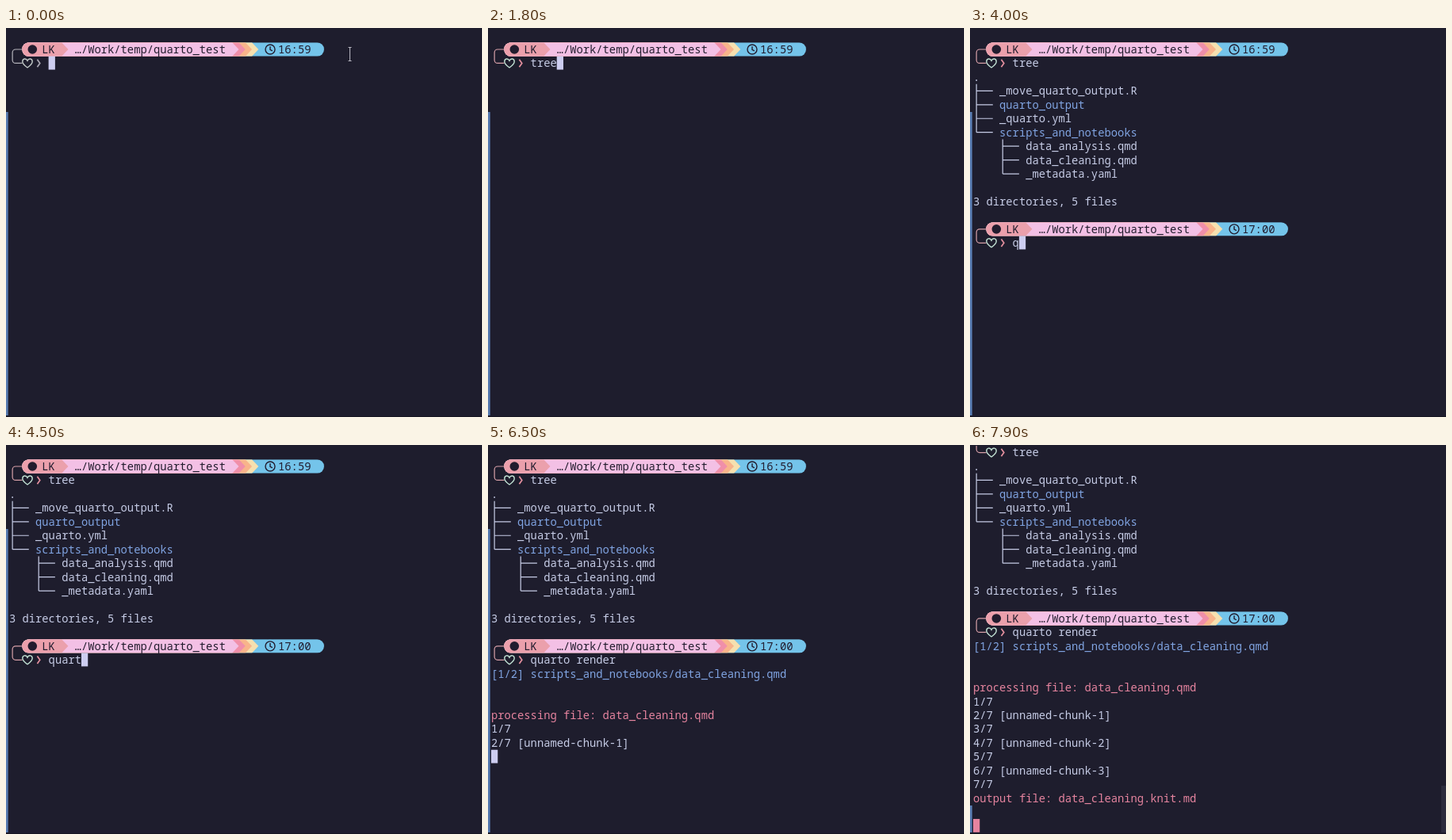
Write an HTML page with a canvas that moves like this. It is 600 px wide and 491 px high and loops after 8000 ms.

```html
<!DOCTYPE html>
<html lang="en">
<head>
<meta charset="utf-8">
<title>Terminal session</title>
<style>
  html, body { margin: 0; width: 100%; height: 100%; overflow: hidden; background: #1e1d2d; }
  canvas { display: block; width: 600px; height: 491px; }
</style>
</head>
<body>
<canvas id="stage" width="600" height="491"></canvas>
<script>
const ctx = document.getElementById('stage').getContext('2d');
const LOOP = 8000;
const CELL = 8.27, LINE = 17.45, LEFT = 4, TOP = 27;
const FONT = '13.78px "Noto Sans Mono", "DejaVu Sans Mono", monospace';
const C = {
  bg: '#1e1d2d', text: '#c6cce6', blue: '#80a4e2', red: '#e6849f',
  ink: '#221c2e', cursor: '#cdcdf0', bar: '#587cb2',
  maroon: '#eba0ac', pink: '#f3c0e5', rose: '#f08fa9',
  peach: '#f8b48b', yellow: '#f6e0af', sky: '#74c4ea'
};

// Keystroke times, one entry per typed character
const TREE_KEYS = [1500, 1600, 1700, 1800];
const RENDER_KEYS = [4000, 4100, 4300, 4400, 4500, 4600, 4700, 4800, 4900, 5000, 5100, 5100, 5200];

// Printed lines: time, row, column, text, colour
const OUTPUT = [
  [2200, 2, 0, '.'],
  [2200, 3, 4, '_move_quarto_output.R'],
  [2200, 4, 4, 'quarto_output', C.blue],
  [2200, 5, 4, '_quarto.yml'],
  [2200, 6, 4, 'scripts_and_notebooks', C.blue],
  [2200, 7, 8, 'data_analysis.qmd'],
  [2200, 8, 8, 'data_cleaning.qmd'],
  [2200, 9, 8, '_metadata.yaml'],
  [2200, 11, 0, '3 directories, 5 files'],
  [6200, 15, 0, '[1/2] scripts_and_notebooks/data_cleaning.qmd', C.blue],
  [6500, 18, 0, 'processing file: data_cleaning.qmd', C.red],
  [7000, 26, 0, 'output file: data_cleaning.knit.md', C.red]
];
for (let i = 1; i <= 7; i++) {
  const chunk = i % 2 ? '' : ` [unnamed-chunk-${i / 2}]`;
  OUTPUT.push([i < 3 ? 6500 : 7000, 18 + i, 0, `${i}/7${chunk}`]);
}

const colX = c => LEFT + c * CELL;
const rowY = r => TOP + r * LINE;
const typed = (keys, t) => keys.filter(k => k <= t).length;

// Characters sit on the terminal's cell grid
function print(row, col, text, color = C.text) {
  ctx.fillStyle = color;
  [...text].forEach((ch, i) => ctx.fillText(ch, colX(col + i), rowY(row) + 4.9));
}

function block(row, col, color = C.cursor) {
  ctx.fillStyle = color;
  ctx.fillRect(colX(col), rowY(row) - LINE / 2, CELL, LINE - 0.6);
}

function stroke(color, width, draw) {
  ctx.strokeStyle = color;
  ctx.lineWidth = width;
  ctx.beginPath();
  draw();
  ctx.stroke();
}

function disc(x, y, r, color) {
  ctx.fillStyle = color;
  ctx.beginPath();
  ctx.arc(x, y, r, 0, Math.PI * 2);
  ctx.fill();
}

// Segment from column a to b, ending in an arrow one cell wide
function segment(row, a, b, color) {
  const y = rowY(row), h = LINE / 2, x = colX(b);
  ctx.fillStyle = color;
  ctx.beginPath();
  ctx.moveTo(colX(a), y - h);
  ctx.lineTo(x, y - h);
  ctx.lineTo(x + CELL, y);
  ctx.lineTo(x, y + h);
  ctx.lineTo(colX(a), y + h);
  ctx.fill();
}

function ribbon(row, clock) {
  const y = rowY(row), h = LINE / 2;
  ctx.save();
  ctx.beginPath();
  ctx.roundRect(colX(2) - 0.3, y - h, CELL * 46 + 0.3, LINE, h);
  ctx.clip();
  ctx.fillStyle = C.sky;
  ctx.fillRect(colX(2) - 1, y - h, CELL * 47, LINE);
  segment(row, 2, 37, C.yellow);
  segment(row, 2, 36, C.peach);
  segment(row, 2, 35, C.rose);
  segment(row, 2, 34, C.pink);
  segment(row, 1, 8, C.maroon);
  ctx.restore();

  disc(33.3, y, 5.8, C.ink);
  print(row, 5, 'LK', C.ink);
  print(row, 10, '…/Work/temp/quarto_test', C.ink);
  stroke(C.ink, 1.4, () => {
    ctx.arc(333, y, 6, 0, Math.PI * 2);
    ctx.moveTo(333, y - 3.8);
    ctx.lineTo(333, y + 0.3);
    ctx.lineTo(335.8, y + 1.8);
  });
  print(row, 41, clock, C.ink);
}

function inputMarks(row, idle) {
  const y = rowY(row), top = rowY(row - 1), x = colX(0.5);
  stroke(idle ? '#b5b4bb' : '#d7a0a8', 1.2, () => {
    ctx.moveTo(colX(2), top);
    ctx.arcTo(x, top, x, y, 4);
    ctx.arcTo(x, y, colX(2), y, 4);
    ctx.lineTo(colX(2), y);
  });
  stroke(idle ? '#c3cbc9' : '#c2e2d4', 1.4, () => {
    ctx.moveTo(27, y + 5.6);
    ctx.bezierCurveTo(23, y + 2.6, 20.8, y + 0.6, 20.8, y - 2);
    ctx.bezierCurveTo(20.8, y - 6.2, 25.5, y - 6.6, 27, y - 3.2);
    ctx.bezierCurveTo(28.5, y - 6.6, 33.2, y - 6.2, 33.2, y - 2);
    ctx.bezierCurveTo(33.2, y + 0.6, 31, y + 2.6, 27, y + 5.6);
  });
  stroke(idle ? '#aaa8b4' : '#e5909f', 1.7, () => {
    ctx.moveTo(39.4, y - 4.7);
    ctx.lineTo(42.8, y);
    ctx.lineTo(39.4, y + 4.7);
  });
}

function branches(col, first, last) {
  const x = colX(col + 0.5);
  stroke(C.text, 1.2, () => {
    ctx.moveTo(x, rowY(first - 0.5));
    ctx.lineTo(x, rowY(last));
    for (let r = first; r <= last; r++) {
      ctx.moveTo(x, rowY(r));
      ctx.lineTo(colX(col + 3), rowY(r));
    }
  });
}

function drawCursor(t) {
  if (t < 2200) block(1, 6 + typed(TREE_KEYS, t));
  else if (t < 2300) block(12, 0);
  else if (t < 5900) block(14, 6 + typed(RENDER_KEYS, t));
  else if (t < 6200) block(15, 0);
  else if (t < 6500) block(16, 0);
  else if (t < 7000) block(21, 0);
  else block(t < 7400 ? 27 : 28, 0, C.red);
}

function ibeam(x, y) {
  stroke('#b9b8c2', 1, () => {
    ctx.moveTo(x, y - 8.5);
    ctx.lineTo(x, y + 8.5);
    for (const end of [y - 8.5, y + 8.5]) {
      ctx.moveTo(x - 2, end);
      ctx.lineTo(x + 2, end);
    }
  });
}

function draw(t) {
  const scroll = t < 7000 ? 0 : t < 7400 ? 1 : 2;
  ctx.fillStyle = C.bg;
  ctx.fillRect(0, 0, 600, 491);
  ctx.font = FONT;
  ctx.textBaseline = 'alphabetic';

  ctx.save();
  ctx.beginPath();
  ctx.rect(0, 1, 600, 489);
  ctx.clip();
  ctx.translate(0, -scroll * LINE);
  inputMarks(1, t < 1500);
  ribbon(0, '16:59');
  print(1, 6, 'tree'.slice(0, typed(TREE_KEYS, t)));
  if (t >= 2200) {
    branches(0, 3, 6);
    branches(4, 7, 9);
  }
  if (t >= 2300) {
    inputMarks(14, false);
    ribbon(13, '17:00');
    print(14, 6, 'quarto render'.slice(0, typed(RENDER_KEYS, t)));
  }
  for (const [at, ...line] of OUTPUT) if (t >= at) print(...line);
  drawCursor(t);
  ctx.restore();

  const barTop = t < 7000 ? 106 : 455;
  ctx.fillStyle = C.bar;
  ctx.fillRect(0, barTop, 2.7, 489 - barTop);
  ctx.fillStyle = '#171622';
  ctx.fillRect(0, 490, 600, 1);
  if (t < 1500) ibeam(433.5, 33);
  if (t >= 7000) {
    const fade = Math.max(0, Math.floor((t - 7600) / 100));
    ctx.fillStyle = `rgba(205, 214, 244, ${0.2 - 0.04 * fade})`;
    ctx.fillRect(594, 430, 6, 59);
  }
}

function tick() {
  draw(performance.now() % LOOP);
  requestAnimationFrame(tick);
}
tick();
</script>
</body>
</html>
```
